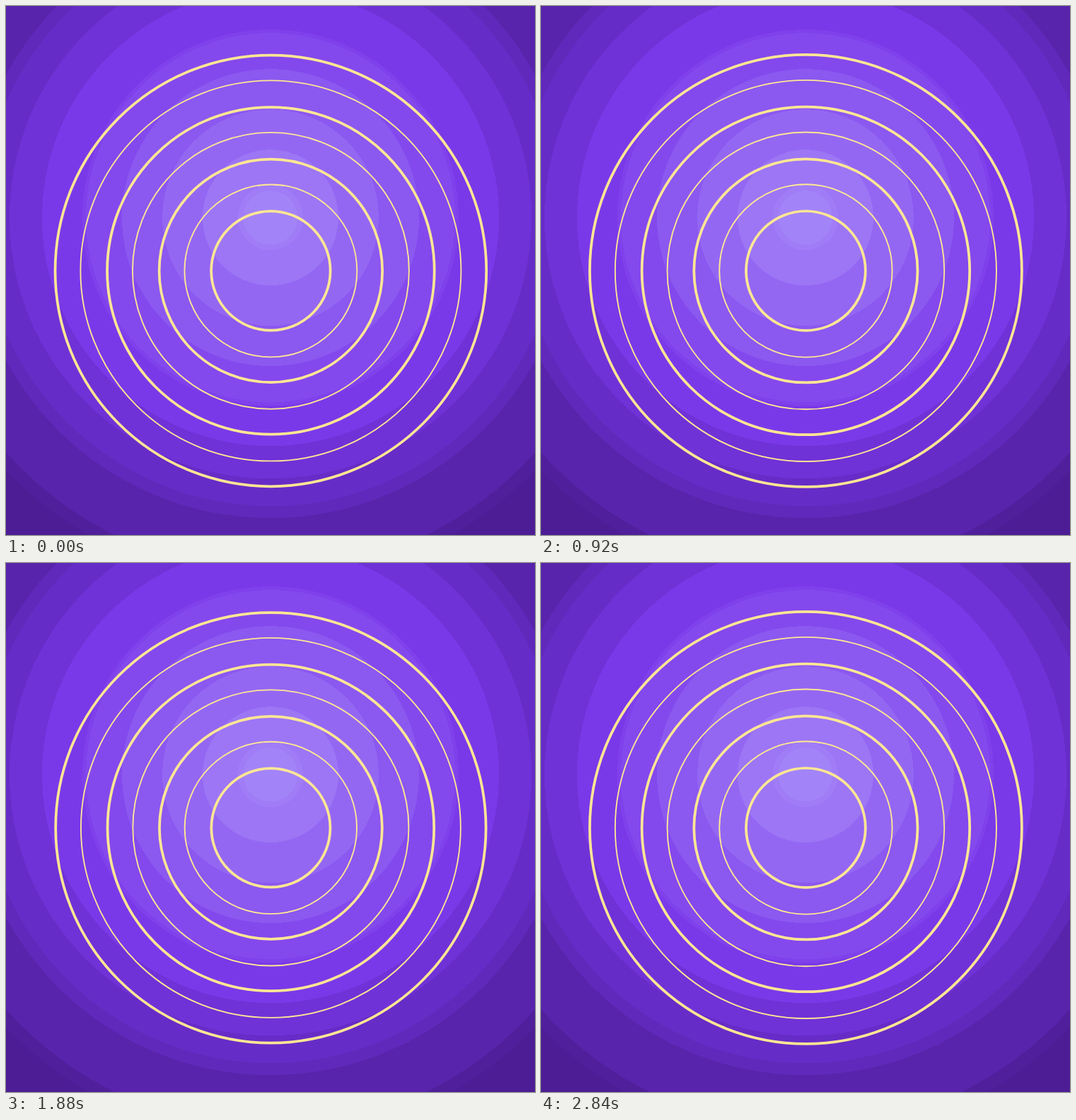
Write an HTML page that moves like this. It is 748 px wide and 748 px high and loops after 2.88 s.

```html
<!DOCTYPE html>
<html lang="en">
<head>
<meta charset="utf-8">
<title>Breathing rings</title>
<style>
  html, body { margin: 0; width: 100%; height: 100%; overflow: hidden; background: #4c1d95; }
  svg { display: block; width: 100vw; height: 100vh; }
</style>
</head>
<body>
<svg viewBox="0 0 748 748">
  <rect width="748" height="748" fill="#4c1d95"/>
  <g id="glow" shape-rendering="crispEdges"></g>
  <g id="rings" fill="none" stroke="#fde694"></g>
</svg>
<script>
const LOOP = 2880, PERIOD = 1920, SWELL = 0.0161;
const CENTER = 374.4, GLOW_X = 374, GLOW_Y = 299.2;

// Glow bands, largest first: radius and colour
const bands = [
  [517, '#501f9c'], [500, '#5824ab'], [425, '#6029bb'], [408, '#662cc7'],
  [369, '#6f32d7'], [323, '#7a39e8'], [266, '#7f41eb'], [261, '#8349ed'],
  [210, '#8b58f0'], [153, '#9467f3'], [96, '#9c76f5'], [46, '#a07df7'],
  [38, '#a284f8']
];

function circle(parent, attrs) {
  const el = document.createElementNS('http://www.w3.org/2000/svg', 'circle');
  for (const key in attrs) el.setAttribute(key, attrs[key]);
  return document.getElementById(parent).appendChild(el);
}

for (const [r, fill] of bands) circle('glow', { cx: GLOW_X, cy: GLOW_Y, r, fill });

// Thick and thin rings alternate; their outer edges are evenly spaced
const rings = Array.from({ length: 7 }, (_, i) => {
  const width = i % 2 ? 1.87 : 3.74;
  return {
    r: 86.1 + 36.77 * i - width / 2,
    el: circle('rings', { cx: CENTER, cy: CENTER, 'stroke-width': width })
  };
});

function draw(t) {
  const scale = 1 + SWELL * Math.sin(2 * Math.PI * t / PERIOD);
  for (const { r, el } of rings) el.setAttribute('r', (r * scale).toFixed(3));
}

const start = performance.now();
function tick(now) {
  draw(Math.max(0, now - start) % LOOP);
  requestAnimationFrame(tick);
}
draw(0);
requestAnimationFrame(tick);
</script>
</body>
</html>
```
